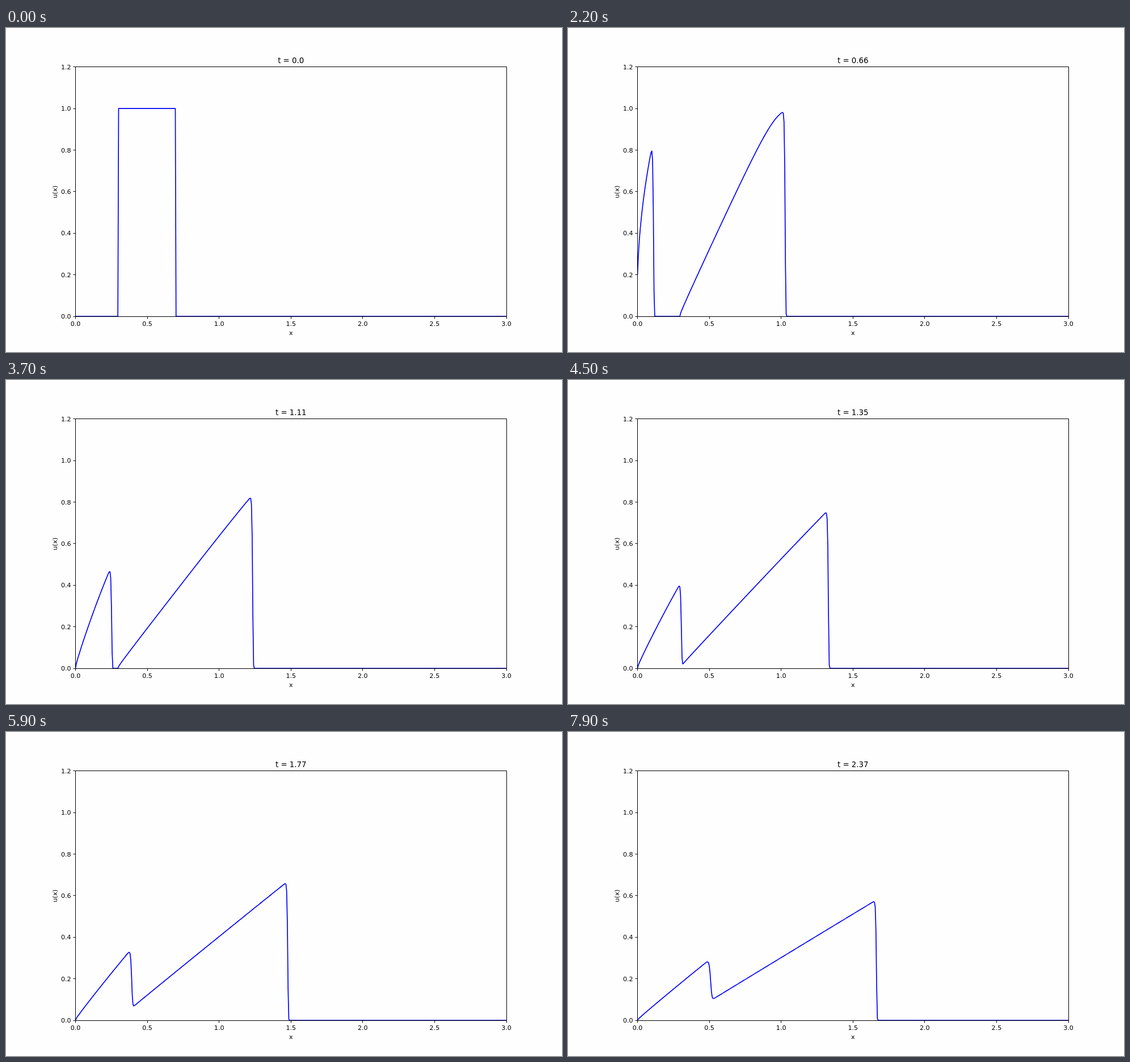
An HTML page for the animation above (8000 ms loop, 980 by 572 pixels).

```html
<!DOCTYPE html>
<html lang="en">
<head>
<meta charset="utf-8">
<title>Travelling wave</title>
<style>
  html, body { margin: 0; width: 100%; height: 100%; overflow: hidden; background: #fefefe; }
  svg { display: block; width: 980px; height: 572px; }
  text { font: 11.11px "DejaVu Sans", sans-serif; fill: #000; text-anchor: middle; }
  #title { font-size: 13.33px; }
  #curve { fill: none; stroke: #00f; stroke-width: 1.67; stroke-linejoin: round; stroke-linecap: square; }
  #axes path { fill: none; stroke: #000; stroke-width: 1; }
  #axes .ylab { text-anchor: end; }
</style>
</head>
<body>
<svg viewBox="0 0 980 572">
  <clipPath id="plot"><rect x="122.5" y="68.6" width="759.5" height="440.5"/></clipPath>
  <path id="curve" clip-path="url(#plot)"/>
  <g id="axes"></g>
  <text id="title" x="502.2" y="62"></text>
  <text x="502.2" y="541.6">x</text>
  <text transform="translate(89.6 289.3) rotate(-90)">u(x)</text>
</svg>
<script>
const FRAMES = 80, FRAME_MS = 100, FRAME_T = 0.03;
const CELLS = 600, DX = 3 / CELLS, STEPS = 30, DT = FRAME_T / STEPS;
const px = x => 122.5 + x * 759.5 / 3;
const py = u => 509.1 - u * 440.4 / 1.2;
const snap = v => Math.floor(v) + 0.5;
const byId = id => document.getElementById(id);

// Axes box, ticks and tick labels
let lines = "M122.5 68.5H882.5V509.5H122.5Z", labels = "";
for (let i = 0; i <= 6; i++) {
  const x = px(i * 0.5), y = py(i * 0.2);
  lines += `M${snap(x)} 509.5v4M122.5 ${snap(y)}h-4`;
  labels += `<text x="${x}" y="526.2">${(i * 0.5).toFixed(1)}</text>` +
    `<text class="ylab" x="114.7" y="${y + 4.1}">${(i * 0.2).toFixed(1)}</text>`;
}
byId("axes").innerHTML = `<path d="${lines}"/>` + labels;

// Triangular pulse entering at the left edge
const inflow = t => Math.max(0, 1 - Math.abs(t - 0.5) / 0.2);

// Inviscid Burgers equation, conservative upwind scheme
const u = Array.from({ length: CELLS + 1 }, (_, i) => i >= 60 && i < 140 ? 1 : 0);
function advance(t) {
  const k = DT / DX / 2;
  for (let i = CELLS; i > 0; i--) u[i] -= k * (u[i] * u[i] - u[i - 1] * u[i - 1]);
  u[0] = inflow(t);
}

const toPath = () => "M" + u.map((v, i) => px(i * DX).toFixed(2) + " " + py(v).toFixed(2)).join("L");
const toLabel = t => "t = " + t.toFixed(2).replace(/0$/, "");

const frames = [];
for (let n = 0; n < FRAMES; n++) {
  frames.push({ path: toPath(), label: toLabel(n * FRAME_T) });
  for (let s = 1; s <= STEPS; s++) advance(n * FRAME_T + s * DT);
}

let shown = -1;
function draw() {
  const n = Math.floor(performance.now() / FRAME_MS) % FRAMES;
  if (n !== shown) {
    byId("curve").setAttribute("d", frames[n].path);
    byId("title").textContent = frames[n].label;
    shown = n;
  }
  requestAnimationFrame(draw);
}
draw();
</script>
</body>
</html>
```
